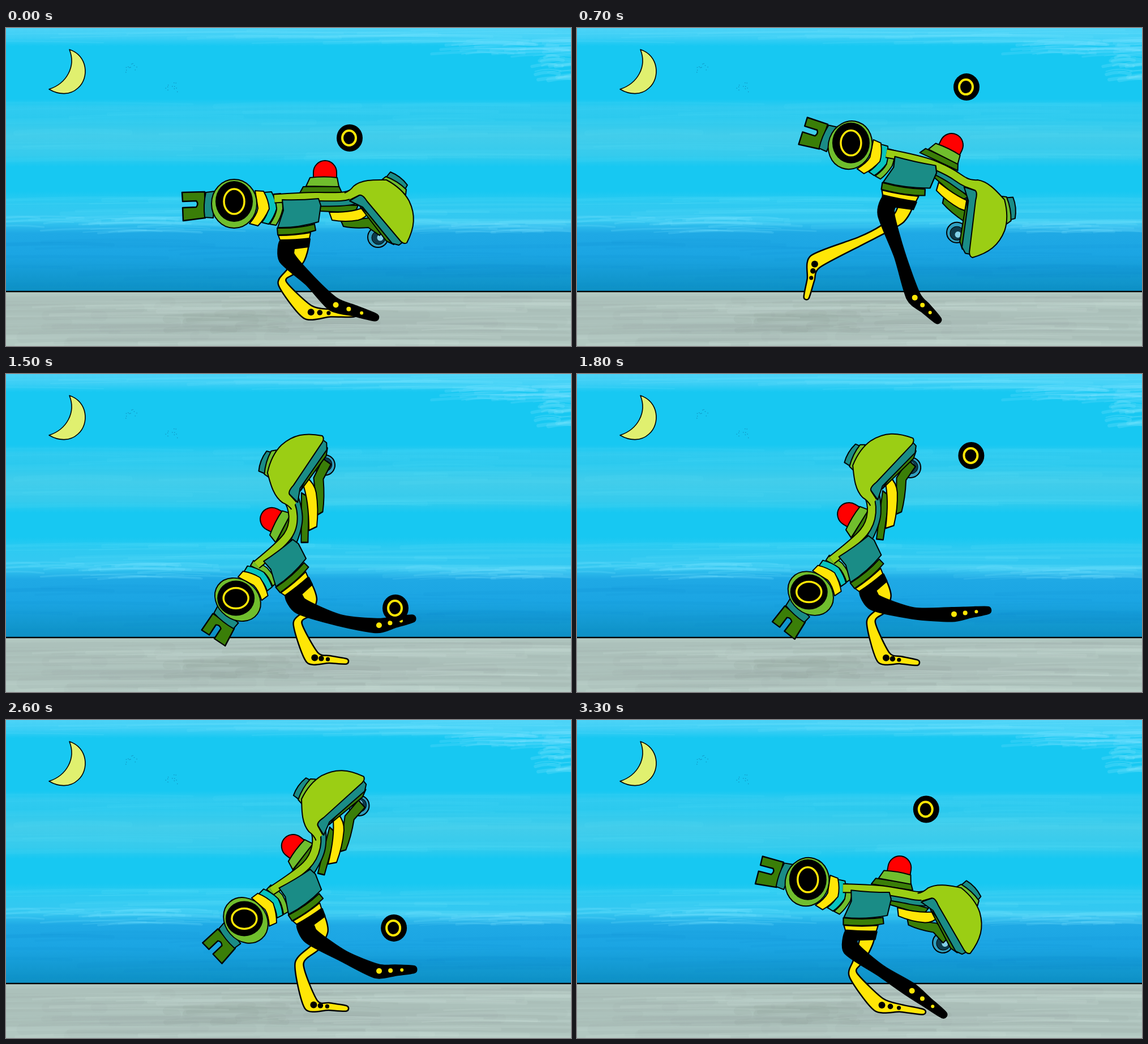
Recreate the animation shown at these times as an HTML page with a canvas. Size 998 by 561 pixels, loop 3400 ms.

```html
<!DOCTYPE html>
<html>
<head>
<meta charset="utf-8">
<style>
html, body { margin: 0; width: 100%; height: 100%; overflow: hidden; }
canvas { display: block; }
</style>
</head>
<body>
<canvas id="stage" width="998" height="561"></canvas>
<script>
const W = 998, H = 561, LOOP = 3400, STEP = 100;
const LIME = '#9bce14', GREEN = '#70be2d', DARK = '#3a7e08', TEAL = '#1a8c86',
      CYAN = '#08c4bf', YELLOW = '#ffe606', RED = '#f00', INK = '#000';
const stage = document.getElementById('stage').getContext('2d');
let ctx = stage;

// torso: x, y, angle; bend: angles of tail, neck, head;
// front: ankle and toe of the black leg; back: knee, heel and toe of the yellow leg
const pose = (torso, bend, front, back) => [...torso, ...bend, ...front, ...back];
const restLegs = [[578, 487, 654, 511], [488, 450, 533, 501, 615, 505]];
const rest = pose([520, 325, 0], [0, 0, 0], ...restLegs);
const sink = pose([540, 340, -4], [-10, -3, -4], ...restLegs);
const dip = pose([500, 345, -2], [0, -2, 0], ...restLegs);
const fling = pose([592, 257, 14], [20, 38, 47], [594, 473, 639, 517], [500, 376, 421, 412, 405, 476]);
const reach = pose([543, 262, -27], [-29, -81, -99], [676, 408, 737, 424], [549, 390, 554, 485, 611, 513]);
const crouch = pose([494, 330, -35], [-54, -91, -106], [655, 444, 720, 431], [515, 440, 541, 500, 602, 507]);
const lift = pose([515, 310, -31], [-43, -71, -79], [675, 388, 742, 390], [527, 433, 543, 500, 602, 514]);
const kick = pose([521, 300, -29], [-41, -77, -92], [655, 443, 722, 440], [518, 430, 539, 502, 602, 509]);
const fold = pose([516, 325, 5], [17, 14, 10], [588, 475, 649, 521], [488, 450, 533, 502, 612, 515]);

const DANCE = [
  [0, rest], [2, sink], [4, sink], [5, dip], [7, fling], [11, reach], [15, crouch], [16, crouch],
  [21, lift], [24, crouch], [25, crouch], [26, kick], [28, lift], [33, fold], [34, rest]
];
// step, x, y, rise of the flight that starts there
const FLIGHTS = [
  [0, 607, 194, 0], [2, 624, 266, 0], [4, 624, 266, 0], [5, 588, 266, 0], [6, 680, 262, 277],
  [11, 720, 359, 0], [15, 688, 413, 0], [16, 688, 413, 227], [21, 709, 285, 0],
  [24, 690, 413, 0], [25.5, 690, 413, 150], [34, 607, 194, 0]
];

const mix = (a, b, u) => a.map((v, i) => v + (b[i] - v) * u);
const segment = (track, s) => track.findLastIndex(key => key[0] <= s);

// Monotone cubic interpolation between poses
function poseAt(s) {
  const i = segment(DANCE, s), last = DANCE.length - 2;
  const [t0, a] = DANCE[i], [t1, b] = DANCE[i + 1], h = t1 - t0, u = (s - t0) / h;
  return a.map((p, j) => {
    const slope = k => {
      const [[ta, pa], [tb, pb]] = DANCE.slice(Math.max(0, Math.min(last, k)));
      return (pb[j] - pa[j]) / (tb - ta);
    };
    const tangent = k => {
      const m = slope(k - 1), n = slope(k);
      return m * n <= 0 ? 0 : 2 * m * n / (m + n);
    };
    return p + (b[j] - p) * u * u * (3 - 2 * u) +
      h * u * (1 - u) * (tangent(i) * (1 - u) - tangent(i + 1) * u);
  });
}

function ballAt(s) {
  const i = segment(FLIGHTS, s), a = FLIGHTS[i], b = FLIGHTS[i + 1], u = (s - a[0]) / (b[0] - a[0]);
  const [, x, y] = mix(a, b, u);
  return [x, y - 4 * a[3] * u * (1 - u)];
}

// A bone moves rest coordinates so that pivot lands on origin, turned by deg
function bone(origin, pivot, deg, stretch = 1) {
  const c = Math.cos(deg * Math.PI / 180), s = Math.sin(deg * Math.PI / 180);
  const at = (x, y) => {
    const dx = (x - pivot[0]) * stretch, dy = y - pivot[1];
    return [origin[0] + dx * c - dy * s, origin[1] + dx * s + dy * c];
  };
  at.apply = () => ctx.setTransform(c * stretch, s * stretch, -s, c, ...at(0, 0));
  return at;
}

function paint(fill, path, line = 2) {
  ctx.fillStyle = fill;
  ctx.strokeStyle = INK;
  ctx.lineWidth = line;
  ctx.fill(path);
  if (line) ctx.stroke(path);
}
const shape = (fill, d, line) => paint(fill, new Path2D(d), line);

function oval(fill, x, y, rx, ry = rx, line = 0) {
  const p = new Path2D();
  p.ellipse(x, y, rx, ry, 0, 0, 7);
  paint(fill, p, line);
}

function ring(x, y, rx, ry, width) {
  ctx.beginPath();
  ctx.ellipse(x, y, rx, ry, 0, 0, 7);
  ctx.strokeStyle = YELLOW;
  ctx.lineWidth = width;
  ctx.stroke();
}

// Outlined ribbon through a few points
function ribbon(color, width, pts) {
  ctx.beginPath();
  ctx.moveTo(...pts[0]);
  for (let i = 1; i < pts.length - 1; i++) {
    const next = pts[i + 1];
    ctx.quadraticCurveTo(...pts[i], ...(i === pts.length - 2 ? next : mix(pts[i], next, 0.5)));
  }
  for (const [c, w] of [[INK, width + 4], [color, width]]) {
    ctx.strokeStyle = c;
    ctx.lineWidth = w;
    ctx.stroke();
  }
}

// Tapered limb: centre points with a width at each
function limb(fill, pts, widths) {
  const left = [], right = [];
  pts.forEach(([x, y], i) => {
    const a = pts[Math.max(0, i - 1)], b = pts[Math.min(pts.length - 1, i + 1)];
    const dx = b[0] - a[0], dy = b[1] - a[1], k = widths[i] / 2 / Math.hypot(dx, dy);
    left.push([x + dy * k, y - dx * k]);
    right.unshift([x - dy * k, y + dx * k]);
  });
  const o = left.concat(right), n = o.length, p = new Path2D(), k = 0.13;
  p.moveTo(...o[0]);
  for (let i = 0; i < n; i++) {
    const [a, b, c, d] = [n - 1, 0, 1, 2].map(step => o[(i + step) % n]);
    p.bezierCurveTo(b[0] + (c[0] - a[0]) * k, b[1] + (c[1] - a[1]) * k,
      c[0] - (d[0] - b[0]) * k, c[1] - (d[1] - b[1]) * k, ...c);
  }
  p.closePath();
  paint(fill, p, 2.5);
}

function spots(color, ankle, toe, first, gap, r) {
  for (let i = 0; i < 3; i++) oval(color, ...mix(ankle, toe, first + i * gap), r - i * r / 5);
}

function drawLegs(torso, [ax, ay, tx, ty, kx, ky, hx, hy, bx, by]) {
  const knee = [kx, ky], heel = [hx, hy], tip = [bx, by], ankle = [ax, ay], toe = [tx, ty];
  limb(YELLOW, [torso(523, 380), torso(517, 406), mix(torso(510, 420), knee, 0.3), knee, heel, mix(heel, tip, 0.5), tip],
    [22, 22, 15, 15, 26, 13, 9]);
  spots(INK, heel, tip, 0.07, 0.19, 6);

  // A level shin sags, a steep one is straight
  const bend = torso(496, 405), shin = mix(bend, ankle, 0.5);
  shin[1] += Math.max(0, 10 - 10 * Math.abs((ay - bend[1]) / (ax - bend[0])));
  limb(INK, [torso(498, 376), bend, shin, ankle, mix(ankle, toe, 0.5), toe], [27, 28, 19, 24, 18, 11]);
  spots(YELLOW, ankle, toe, 0.06, 0.3, 5);

  torso.apply();
  shape(INK, 'M484 374L537 372L535 386L511 389L486 392Z');
  shape(YELLOW, 'M481 366Q510 366 538 361L536 371Q512 374 484 374Z');
  shape(DARK, 'M479 353Q515 354 545 346L547 357Q520 365 480 365Z');
  ctx.resetTransform();
}

function drawTail(tail, upright) {
  tail.apply();
  shape(GREEN, 'M473 293L485 292Q489 305 489 319Q485 336 477 348L466 346Q477 330 478 320Z');
  shape(CYAN, 'M456 290L469 289Q477 304 478 319Q473 335 464 346L452 343Q462 330 463 320Z');
  shape(YELLOW, 'M440 287L455 288Q464 304 465 319Q457 337 445 349L430 345Q443 330 445 318Z');
  shape(DARK, 'M311 290L351 289L352 335L313 340L312 317L336 316Q341 310 336 305L312 306Z', 2.5);
  shape(TEAL, 'M353 290L369 288L366 335L351 334Q348 312 353 290Z');
  oval(GREEN, 403, 310, 40, 43, 2);
  ctx.resetTransform();
  const eye = tail(403, 306);
  oval(INK, ...eye, 33, 36 - 5 * upright);
  ring(...eye, 18 + 4 * upright, 22 - 4 * upright, 3.5);
}

function drawRobot(s) {
  const [x, y, turn, tailTurn, neckTurn, headTurn, ...legs] = poseAt(s);
  const torso = bone([x, y], [520, 325], turn, 1 + Math.max(0, neckTurn) / 250);
  const tail = bone(torso(478, 322), [478, 322], tailTurn, 1 - Math.abs(tailTurn) / 450);
  const lamp = bone(torso(545, 295), [545, 295], (turn + neckTurn) / 2);
  const neck = bone(torso(560, 305), [560, 305], neckTurn, 1 + Math.abs(neckTurn) / 300);
  const head = bone(neck(612, 300), [612, 300], headTurn);

  drawLegs(torso, legs);
  drawTail(tail, Math.min(1, Math.max(0, -turn / 28)));

  lamp.apply();
  shape(RED, 'M543 267V255A20.5 21 0 0 1 584 255V267Z');
  shape(DARK, 'M519 291L525 280L588 279L593 290Z');
  shape(GREEN, 'M530 279L537 264Q562 261 585 264L588 280Z');

  head.apply();
  oval('#2f9fc0', 657, 369, 18, 18, 2);
  oval('#0d3b4b', 658, 370, 12, 12, 1);
  oval('#82cfe6', 661, 370, 5.5);
  neck.apply();
  shape(DARK, 'M592 341L642 335L668 352L660 366L640 352Q615 354 596 350Z');
  shape(DARK, 'M555 311L622 313L616 326L555 323Z');
  shape(YELLOW, 'M571 325Q612 326 636 315L643 322Q635 336 622 339Q600 343 576 339Z');
  ctx.resetTransform();

  ribbon(TEAL, 9, [torso(545, 309), neck(575, 309), neck(605, 308), head(632, 302)]);
  ribbon(LIME, 13, [torso(474, 301), torso(530, 297), neck(575, 298), neck(606, 297), head(620, 288)]);

  torso.apply();
  shape(TEAL, 'M488 303Q520 304 552 301L556 313L552 342Q515 353 480 352L490 322Z');

  head.apply();
  shape(DARK, 'M625 315L692 372L685 382L672 376Z');
  shape(TEAL, 'M607 305L628 293L642 307L702 377L694 383L682 380L630 316Z');
  shape(TEAL, 'M671 264L679 254Q697 261 709 277L704 286Z');
  shape(GREEN, 'M660 271L671 262Q692 270 707 285L706 294Z');
  shape(LIME, 'M598 291Q607 288 614 279C630 266 655 268 672 268Q700 283 712 305C724 330 722 352 708 379Q703 382 697 376L638 306Q630 293 624 295L608 303');
  ctx.resetTransform();
}

function drawBall(s) {
  const [x, y] = ballAt(s);
  oval(INK, x, y, 23, 24);
  ring(x - 1, y, 12, 13, 4);
}

function paintScene() {
  let seed = 7;
  const rnd = (a, b) => {
    seed = (seed * 16807) % 2147483647;
    return a + (b - a) * seed / 2147483647;
  };
  const streaks = (n, color, x0, x1, y0, y1, width) => {
    ctx.strokeStyle = color;
    for (let i = 0; i < n; i++) {
      const x = rnd(x0, x1), y = rnd(y0, y1), len = rnd(0.2, 0.7) * (x1 - x0);
      ctx.lineWidth = rnd(1, width);
      ctx.beginPath();
      ctx.moveTo(x - len / 2, y + 3);
      ctx.quadraticCurveTo(x, y - 4, x + len / 2, y + 2);
      ctx.stroke();
    }
  };
  const sky = ctx.createLinearGradient(0, 0, 0, 465);
  const stops = [[0, '#4dd3f7'], [18, '#3acef5'], [32, '#17c8f2'], [125, '#17c8f2'], [140, '#30cbf0'],
    [160, '#2bc9ee'], [190, '#42cdeb'], [225, '#35cbed'], [245, '#17c8f2'], [288, '#17c8f2'],
    [308, '#2ecaf1'], [340, '#35c8f1'], [362, '#1fa9e5'], [400, '#1ba5e3'], [465, '#0d90c4']];
  for (const [y, c] of stops) sky.addColorStop(y / 465, c);
  ctx.fillStyle = sky;
  ctx.fillRect(0, 0, W, H);
  ctx.lineCap = 'round';
  const foam = alpha => `rgba(125,225,252,${alpha})`;
  streaks(25, foam(0.12), 0, W, 0, 26, 6);
  streaks(30, foam(0.06), 0, W, 132, 235, 10);
  streaks(25, foam(0.09), 0, W, 296, 355, 8);
  streaks(26, foam(0.18), 0, 330, 332, 360, 5);
  streaks(20, foam(0.15), 700, W, 338, 362, 5);
  streaks(45, foam(0.2), 830, 1080, 18, 48, 6);
  streaks(25, foam(0.25), 950, 1060, 45, 90, 8);
  streaks(30, 'rgba(10,130,200,.07)', 0, W, 372, 460, 10);

  ctx.fillStyle = '#b2c8c1';
  ctx.fillRect(0, 465, W, 96);
  streaks(50, 'rgba(140,158,152,.08)', 0, W, 474, 556, 20);
  streaks(16, 'rgba(130,145,140,.12)', 300, 600, 485, 535, 16);
  streaks(30, 'rgba(208,226,219,.15)', 0, W, 470, 560, 8);
  ctx.fillStyle = INK;
  ctx.fillRect(0, 463.7, W, 2.4);

  ctx.fillStyle = 'rgba(10,90,140,.5)';
  for (const [x, y] of [[222, 70], [292, 104]])
    for (let i = 0; i < 11; i++) ctx.fillRect(x + rnd(-11, 10), y + rnd(-8, 8), 1.3, 1.3);

  shape('#e0f06f', 'M112 38C144 48 148 88 127 106C113 119 93 118 76 108C107 98 124 68 112 38Z', 1.6);
}

const scene = document.createElement('canvas');
scene.width = W;
scene.height = H;
ctx = scene.getContext('2d');
ctx.lineJoin = 'round';
paintScene();
ctx = stage;
ctx.lineJoin = 'round';

function frame() {
  const s = Math.floor(performance.now() % LOOP / STEP);
  ctx.drawImage(scene, 0, 0);
  drawRobot(s);
  drawBall(s);
  requestAnimationFrame(frame);
}
frame();
</script>
</body>
</html>
```
